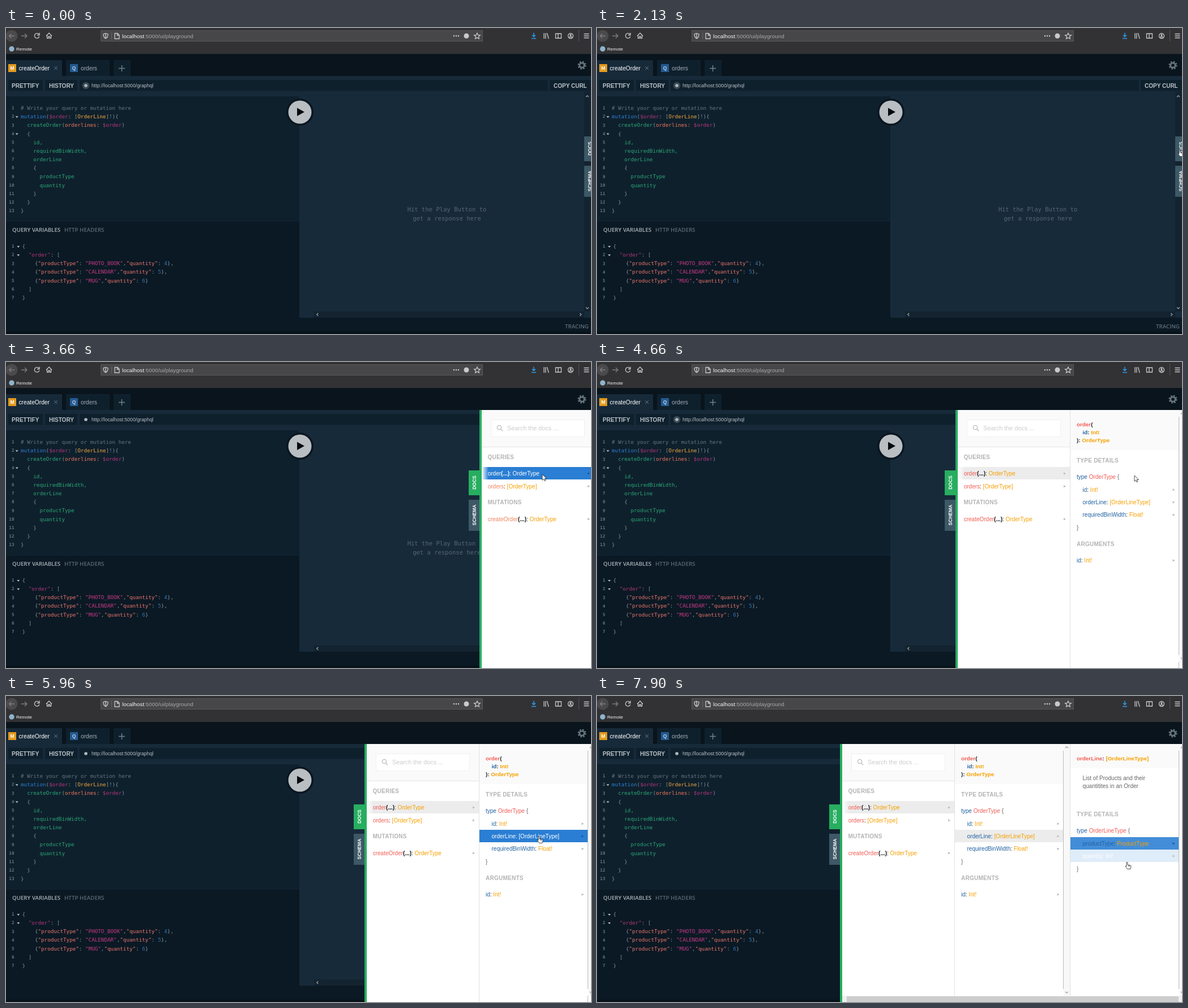
Recreate the animation shown at these times as an HTML page. Size 1033 by 542 pixels, loop 8 s.

```html
<!DOCTYPE html>
<html lang="en">
<head>
<meta charset="utf-8">
<title>GraphQL playground</title>
<style>
html, body { margin: 0; width: 100%; height: 100%; overflow: hidden; background: #0b1924 }
svg { display: block; width: 1033px; height: 542px }
text { white-space: pre; font: 10px "Liberation Sans", Arial, sans-serif }
text.code { font: 9.25px "DejaVu Sans Mono", monospace }
text.num { font: bold 7.6px "DejaVu Sans Mono", monospace; text-anchor: end; fill: #66767f }
text.hint { font: 10.55px "DejaVu Sans Mono", monospace; text-anchor: middle; fill: #566773 }
text.bold { font-weight: bold }
text.title { font-weight: bold; font-size: 9.85px }
text.caps { font: 600 9.75px "Open Sans", sans-serif }
text.head { font-weight: bold; letter-spacing: .25px; fill: #b3b3b3 }
text.tab { font-weight: bold; font-size: 8.5px; text-anchor: middle; fill: #fff }
.line { fill: none; stroke: #c9c9ca; stroke-width: 1.3 }
.c { fill: #65747e } .k { fill: #2a7ed3 } .v { fill: #b5357d } .p { fill: #828f97 }
.y { fill: #f5a93b } .g { fill: #2aa876 } .o { fill: #f0785f } .s { fill: #c83a86 }
.e { fill: #ea756e } .n { fill: #2f74b5 }
.r { fill: var(--name) } .b { fill: #1f61a0 } .t { fill: #f5a000 } .x { fill: #666 }
.d { fill: #1d2833 } .D { fill: #111; font-weight: bold }
.hot tspan { fill: #fff }
</style>
</head>
<body>
<svg id="stage" viewBox="0 0 1033 542"></svg>
<script>
const STEP = 203.5;
const rect = (x, y, w, h, fill, more = '') =>
  `<rect x="${x}" y="${y}" width="${w}" height="${h}" fill="${fill}" ${more}/>`;
const circle = (x, y, r, fill, more = '') =>
  `<circle cx="${x}" cy="${y}" r="${r}" fill="${fill}" ${more}/>`;
const path = (d, more = 'class="line"') => `<path d="${d}" ${more}/>`;
const text = (x, y, body, cls = '', more = '') =>
  `<text x="${x}" y="${y}" class="${cls}" ${more}>${body}</text>`;
// Coloured runs: "kkeyword|pplain", the first letter of each run is its class.
const runs = s => s.split('|').map(p => `<tspan class="${p[0]}">${p.slice(1)}</tspan>`).join('');
const fill = c => `fill="${c}"`;
const chevron = (x, y, turn, color = '#8b979e') =>
  path('M-2.5 1.3 0 -1.3 2.5 1.3', `fill="none" stroke="${color}" stroke-width="1.4" transform="translate(${x} ${y}) rotate(${turn})"`);

function browser() {
  return rect(0, 0, 1033, 46, '#323234') +
    rect(167.5, 4.5, 674, 19, '#474749', 'stroke="#58585b"') +
    circle(10, 14, 10.5, '#4a4a4d') +
    path('M15 14H5.5m4-4-4 4 4 4', 'class="line" style="stroke:#7f7f81"') +
    path('M27 14h10m-4-4 4 4-4 4', 'class="line" style="stroke:#7f7f81"') +
    path('M58 11a4.3 4.3 0 1 0 .8 4M59 8.5v4h-4') +
    path('M71 14l5-5 5 5M72.5 13v5h2.5v-3h2v3h2.5v-5') +
    path('M176 9.5l4 1.2c0 4-1 6.5-4 8-3-1.5-4-4-4-8zM176 10v8') +
    path('M186.5 8v12', 'stroke="#66666a"') +
    path('M192 9.5h5l3 3v6.5h-8zM196.5 9.5v3.5h3.5') +
    text(205, 18, '<tspan fill="#f4f4f5">localhost</tspan><tspan fill="#a9a9ab">:5000/ui/playground</tspan>', '', 'style="font-size:9.9px"') +
    [791, 795, 799].map(x => circle(x, 14, 1.2, '#d0d0d1')).join('') +
    circle(813, 14, 4.5, '#c9c9ca') +
    path('M832 9l1.6 3.4 3.7.4-2.8 2.5.8 3.7-3.3-1.9-3.3 1.9.8-3.7-2.8-2.5 3.7-.4z') +
    path('M932 8.5v7m-3-3 3 3 3-3M928 18.5h8', 'fill="none" stroke="#2f9be8" stroke-width="1.5"') +
    path('M950 9v10M952.8 9v10M955.3 9l3 10') +
    path('M970.5 10h10v8h-10zM975 10v8') +
    circle(997, 14, 4.5, 'none', 'class="line"') + circle(997, 12.7, 1.7, '#c9c9ca') +
    path('M994 17c1-2 5-2 6 0') +
    path('M1011.5 3v21', 'stroke="#55555a"') +
    path('M1020.5 10.5h9m-9 3.5h9m-9 3.5h9') +
    circle(10, 37, 4.7, '#8fb4cc') +
    text(18, 40, 'Remote', '', 'fill="#f4f4f5" style="font-size:8px"');
}

function code(lines, x, y0, step, folds) {
  return lines.map((s, i) => {
    const y = y0 + i * step, lead = s.match(/^ */)[0].length;
    return text(14.5, y - .7, i + 1, 'num') +
      text(x + lead * 5.57, y, runs(s.trim()), 'code') +
      (folds.includes(i + 1) ? path(`M${x - 9.3} ${y - 4}h5l-2.5 3z`, fill('#b9c2c7')) : '');
  }).join('');
}

const product = (type, n, end) => `    p{|e"productType"|p: |s"${type}"|p,|e"quantity"|p: |n${n}|p}${end}`;

function editor() {
  const button = fill('#b9c2c8');
  return rect(0, 46, 1033, 39, '#09141c') + rect(0, 85, 1033, 428, '#172a3a') +
    rect(0, 57, 99, 29, '#172a3a') + rect(106, 57, 77, 28, '#0f202d') + rect(190, 57, 30, 28, '#0f202d') +
    rect(4, 64, 14, 14, '#e49a1e') + text(11, 74.2, 'M', 'tab') +
    text(22.5, 74.5, 'createOrder', '', 'fill="#fff" style="font-size:10.2px"') +
    path('M85 68l6 6m0-6-6 6', 'stroke="#65747e"') +
    rect(113, 64, 14, 14, '#245a92') + text(120, 74.2, 'Q', 'tab', 'opacity=".7"') +
    text(132, 74.5, 'orders', '', 'fill="#a0abb2" style="font-size:10.2px"') +
    path('M199 71.5h11m-5.5-5.5v11', 'stroke="#71808a" stroke-width="1.5"') +
    circle(1017, 66, 4.2, 'none', 'stroke="#69757d" stroke-width="2.8"') +
    circle(1017, 66, 6.4, 'none', 'stroke="#69757d" stroke-width="2.4" stroke-dasharray="2.513"') +
    rect(4, 92, 61, 19.5, '#0f202d') + rect(69, 92, 57, 19.5, '#0f202d') +
    rect(130, 92, 827, 19.5, '#0f202d') + rect(960, 92, 73, 19.5, '#0f202d') +
    text(10, 105.5, 'PRETTIFY', 'bold', button) + text(76, 105.5, 'HISTORY', 'bold', button) +
    text(967, 105.5, 'COPY CURL', 'bold', button) +
    circle(141, 102, 6.2, '#3b4954', 'id="ring"') + circle(141, 102, 2.8, '#b0b8bd') +
    text(151, 105.3, 'http://localhost:5000/graphql', '', 'fill="#b7c0c6" style="font-size:8.7px"') +
    rect(0, 121, 518, 222, '#0f202d') + rect(0, 343, 518, 195, '#0b1924') +
    rect(518, 513, 515, 25, '#0b1924') + rect(0, 538, 1033, 4, '#07121a') +
    code(['c# Write your query or mutation here',
      'kmutation|p(|v$order|p: [|yOrderLine|p]!){',
      '  gcreateOrder|p(|oorderlines:|p |v$order|p)', '  p{',
      '    gid,', '    grequiredBinWidth,', '    gorderLine', '    p{',
      '      gproductType', '      gquantity', '    p}', '  p}', 'p}'], 26, 145, 15.17, [2, 4]) +
    text(11, 361, 'QUERY VARIABLES', 'caps', fill('#a9b3b9')) +
    text(103, 361, 'HTTP HEADERS', 'caps', fill('#5b6a75')) +
    code(['p{', '  v"order"|p: [', product('PHOTO_BOOK', 4, ','), product('CALENDAR', 5, ','),
      product('MUG', 6, ''), '  p]', 'p}'], 28.6, 389.9, 15.17, [1, 2]) +
    text(778.5, 325, 'Hit the Play Button to', 'hint') + text(778.5, 341.3, 'get a response here', 'hint') +
    rect(1021, 113, 12, 389, '#13232f') + rect(544, 502, 477, 11, '#13232f') +
    chevron(1026.5, 121, 0) + chevron(1026.5, 496, 180) + chevron(550, 507.5, -90) + chevron(1014.5, 507.5, 90) +
    text(987, 532, 'TRACING', 'caps', fill('#5f6e78')) +
    circle(519, 149, 24, '#0a1620') + circle(519, 149, 20.5, '#b9bec2') +
    path('M514 141.5v14.5l13-7.2z', fill('#050a0e'));
}

const rows = [];
// A clickable entry of the docs; the column decides its horizontal extent.
function row(col, y, s, indent = 0) {
  const left = [4, 203, 407][col], right = [202, 395, 599][col], top = Math.round(y - 11);
  const id = rows.push({ col, top, left, right }) - 1;
  const bar = (color, cls) => rect(left, top, right - left, 22, color, `class="${cls}" opacity="0"`);
  return `<g id="row${id}">` + bar('#ececec', 'active') + bar('#2a7ed3', 'hover') +
    text([14.7, 214, 418][col] + indent, y + 3.5, runs(s)) +
    path(`M${[191, 383.5, 587.5][col]} ${y - 2}l4 2.2-4 2.2z`, 'class="more"') + '</g>';
}

const scrollbar = (x, bottom) => rect(x, 85, 11, bottom - 85, '#f8f8f8') +
  rect(x - 1, 97, 1, bottom - 109, '#bbb') + chevron(x + 5.5, 91, 0, '#aaa') + chevron(x + 5.5, bottom - 6, 180, '#aaa');

function docs() {
  const tab = (y, h, name, id) => rect(-19, y, 20, h, '#3d5866', `id="${id}"`) +
    text(0, 0, name, 'tab', `transform="translate(-6 ${y + h / 2 - .5}) rotate(-90)"`);
  return tab(192, 44, 'DOCS', 'docsTab') + tab(244, 55, 'SCHEMA', 'schemaTab') +
    rect(0, 85, 620, 457, '#fff') +
    rect(4, 85, 198, 65, '#fafafa') + rect(4, 150, 198, 1, '#e6e6e6') +
    rect(20.5, 102.5, 165, 30, '#fff', 'stroke="#f0f0f0"') +
    circle(35, 116, 3.6, 'none', 'stroke="#bbb" stroke-width="1.3"') +
    path('M37.8 119l3.2 3.2', 'stroke="#bbb" stroke-width="1.3"') +
    text(49, 120.8, 'Search the docs ...', '', 'fill="#ccc" style="font-size:10.8px"') +
    text(14.5, 172, 'QUERIES', 'head') +
    row(0, 197.3, 'rorder|D(...)|d: |tOrderType') + row(0, 220, 'rorders|d: |t[OrderType]') +
    text(14.5, 252, 'MUTATIONS', 'head') + row(0, 278, 'rcreateOrder|D(...)|d: |tOrderType') +
    rect(4, 151, 12, 380, 'url(#edge)') +
    '<g id="col1">' + rect(202, 85, 193, 71, '#fafafa') +
    text(214, 113.5, runs('rorder|d('), 'title') +
    text(224.5, 127.5, runs('bid|d: |tInt!'), 'title') +
    text(214, 141.7, runs('d): |tOrderType'), 'title') +
    text(214, 178, 'TYPE DETAILS', 'head') + text(214, 206.7, runs('btype |rOrderType |x{')) +
    row(1, 226, 'bid|d: |tInt!', 10.5) + row(1, 248.2, 'borderLine|d: |t[OrderLineType]', 10.5) +
    row(1, 270.5, 'brequiredBinWidth|d: |tFloat!', 10.5) + text(214, 296.5, '}', 'x') +
    text(214, 325.5, 'ARGUMENTS', 'head') + row(1, 351.3, 'bid|d: |tInt!') +
    rect(202, 85, 1, 457, '#e2e2e2') + scrollbar(395, 531) + rect(394, 531, 1, 11, '#bbb') + '</g>' +
    '<g id="col2">' + rect(406, 85, 193, 43, '#fafafa') +
    text(418, 113.5, runs('rorderLine|d: |t[OrderLineType]'), 'title') +
    text(428.5, 149, 'List of Products and their', 'x') + text(428.5, 163.3, 'quantitites in an Order', 'x') +
    text(418, 213, 'TYPE DETAILS', 'head') + text(418, 241.8, runs('btype |rOrderLineType |x{')) +
    row(2, 261, 'bproductType|d: |tProductType', 10.5) + row(2, 283.3, 'bquantity|d: |tInt!', 10.5) +
    text(418, 309.5, '}', 'x') + rect(406, 85, 1, 446, '#e2e2e2') + scrollbar(599, 531) +
    rect(4, 531, 610, 11, '#f0f0f0') + rect(12, 532, 586, 10, '#cdcdcd') + '</g>' +
    rect(0, 85, 4, 457, '#27ae60');
}

const $ = id => document.getElementById(id);
$('stage').innerHTML = '<defs><linearGradient id="edge"><stop stop-color="#fff"/><stop offset="1" stop-color="#fff" stop-opacity="0"/></linearGradient></defs>' +
  browser() + editor() + `<g id="docs">${docs()}</g><g id="cursor">` +
  path('M0 0v10.5l2.5-2.3 1.7 3.6 1.7-.8-1.7-3.5h3.3z', 'id="arrow" fill="#fff" stroke="#222" stroke-width=".8"') +
  path('M-1 1q1-1.6 2 0v4l5 1q1.2.4 1 2l-1 4.5h-5.5l-3-4.2q-.8-1.6.8-1.3l.7.8zM2.6 6v2M4.5 6.3v2',
    'id="hand" fill="#fff" stroke="#222" stroke-width=".8" stroke-linejoin="round"') + '</g>';

// Pointer tip: time, x, y
const track = [[0, 1014, 560], [100, 1014, 536], [700, 1024, 202], [1000, 1026, 205], [1700, 1029, 215],
  [2300, 1029, 215], [2600, 1022, 214], [2800, 1022, 214], [3500, 947, 199], [4000, 947, 199], [4300, 949, 201],
  [4700, 949, 201], [5100, 945, 221], [5300, 944, 226], [5700, 942, 251], [5900, 941, 248],
  [6800, 941, 248], [6900, 940, 248], [7500, 940, 249], [7700, 939, 256], [7800, 938, 268], [7900, 936, 294]];

function pointer(t) {
  const i = track.findIndex(k => k[0] > t);
  if (i < 0) return track[track.length - 1].slice(1);
  const a = track[i - 1], b = track[i], f = (t - a[0]) / (b[0] - a[0]);
  return [a[1] + (b[1] - a[1]) * f, a[2] + (b[2] - a[2]) * f];
}
// Number of opened columns beyond the first; -1 while the docs are closed
const level = t => (t >= 2300) + (t >= 4000) + (t >= 7300) - 1;
const shift = t => Math.round(836 - STEP * level(t));

function hovered(t) {
  if (t < 0 || level(t) < 0) return -1;
  const [x, y] = pointer(t), px = x - shift(t);
  return rows.findIndex(r => r.col <= level(t) && px >= r.left && px < r.right && y >= r.top && y < r.top + 22.5);
}

function draw(now) {
  const t = Math.floor(now % 8000 / 100) * 100;
  const n = level(t), hot = hovered(t), before = hovered(t - 100);
  const [x, y] = pointer(t);
  $('docs').setAttribute('transform', `translate(${shift(t)})`);
  $('docs').style.setProperty('--name', n < 1 ? '#ef8560' : '#f25c54');
  $('docsTab').setAttribute('fill', n < 0 ? '#3d5866' : '#27ae60');
  $('col1').style.display = n > 0 ? '' : 'none';
  $('col2').style.display = n > 1 ? '' : 'none';
  rows.forEach((r, i) => {
    const part = name => $('row' + i).querySelector(name);
    $('row' + i).setAttribute('class', i === hot ? 'hot' : '');
    part('.hover').setAttribute('opacity', .15 * (i === hot) + .88 * (i === before));
    part('.active').setAttribute('opacity', +(i === 0 && n > 0 || i === 4 && n > 1));
    part('.more').setAttribute('fill', i === before ? '#1c5a99' : '#b9bdc0');
  });
  const onTab = n < 0 && x > 1020 && (y > 192 && y < 236 || y > 244 && y < 299);
  const hand = onTab || hot > 0;
  $('cursor').setAttribute('transform', `translate(${x} ${y})`);
  $('hand').style.display = hand ? '' : 'none';
  $('arrow').style.display = hand ? 'none' : '';
  $('ring').style.display = t < 2400 || t >= 4000 && t < 5000 || t >= 6200 && t < 6700 ? '' : 'none';
}

const start = performance.now();
(function frame() {
  draw(performance.now() - start);
  requestAnimationFrame(frame);
})();
</script>
</body>
</html>
```
